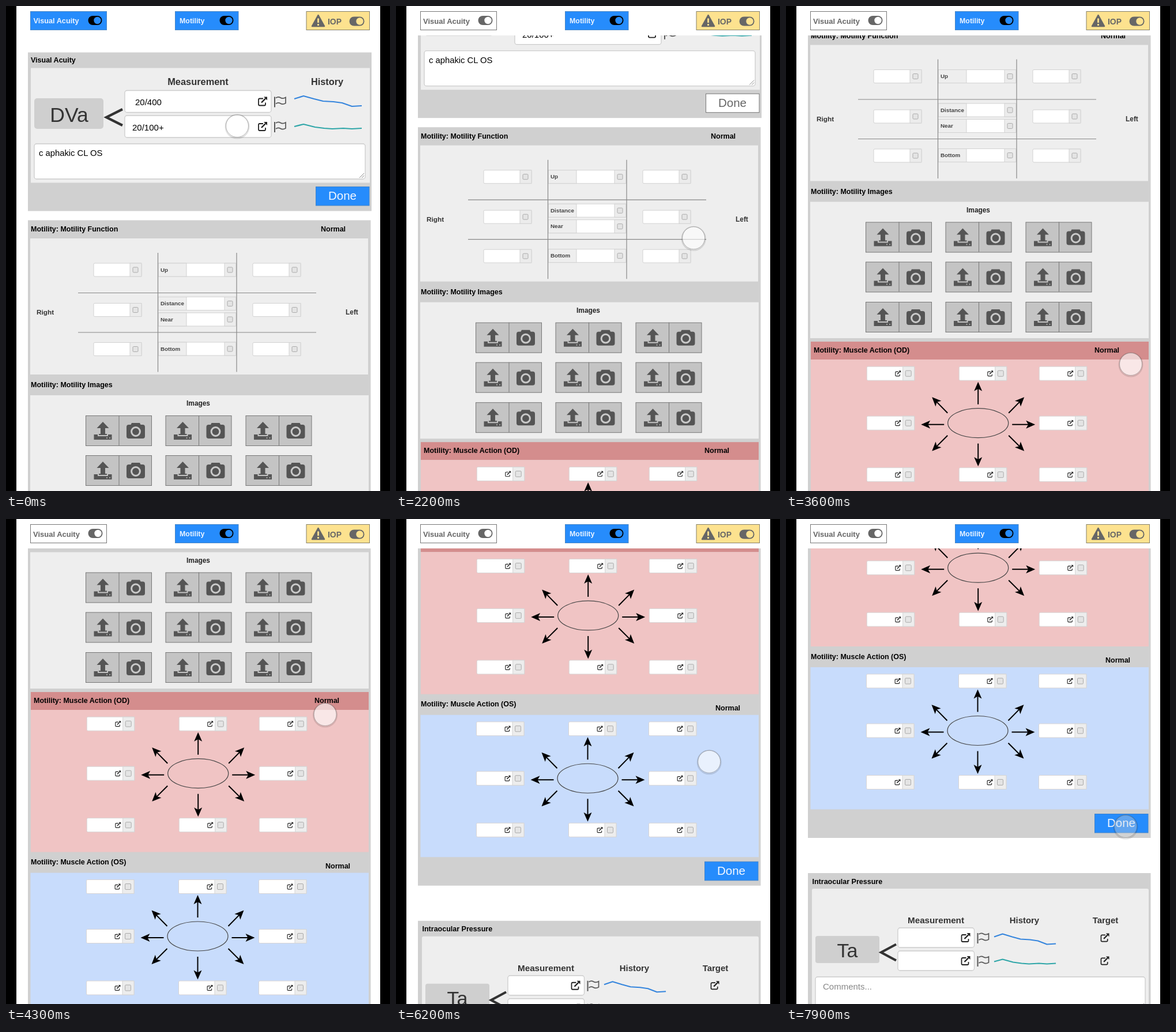
These frames come from a looping animation (666 by 841 pixels, 8 s). An HTML page:

```html
<!DOCTYPE html>
<html lang="en">
<head>
<meta charset="utf-8">
<title>Eye exam form</title>
<style>
html, body { margin: 0; width: 100%; height: 100%; overflow: hidden; background: #fff; }
svg { display: block; width: 666px; height: 841px; font-family: "Liberation Sans", Arial, sans-serif; }
</style>
</head>
<body>
<svg id="stage" viewBox="0 0 666 841" xmlns="http://www.w3.org/2000/svg"></svg>
<script>
const BLUE = '#268cfc', GREY = '#d0d0d0', PANEL = '#eeeeee', INK = '#333', MID = '#666';

const rect = (x, y, w, h, fill, extra = '') =>
  `<rect x="${x}" y="${y}" width="${w}" height="${h}" fill="${fill}" ${extra}/>`;
const path = (d, stroke, width = 1, extra = '') =>
  `<path d="${d}" fill="none" stroke="${stroke}" stroke-width="${width}" ${extra}/>`;
const text = (s, x, y, size, fill = '#000', extra = '') =>
  `<text x="${x}" y="${y}" font-size="${size}" fill="${fill}" ${extra}>${s}</text>`;
const bold = (s, x, y, size = 12.5, fill = '#000', extra = '') =>
  text(s, x, y, size, fill, `font-weight="700" ${extra}`);
const MIDDLE = 'text-anchor="middle"';
const at = (x, y, body, scale = 1) => `<g transform="translate(${x} ${y}) scale(${scale})">${body}</g>`;

// Icons are drawn around their own centre.
const link = (x, y, size) => at(x, y,
  path('M1-5H-5Q-7-5-7-3V5Q-7 7-5 7H3Q5 7 5 5V2', '#222', 1.8) +
  path('M-2 2L5-5', '#222', 2.4) + '<path d="M2-8H8V-2Z" fill="#222"/>', size / 16);

const flag = (x, y) => at(x, y,
  path('M-9-7V11', '#555', 2) +
  path('M-7-5Q-3-8 1-5.500T10-6V4Q5 7 1 4.500T-7 5', '#555', 1.7));

const toggle = (x, y, w, fill, knob) =>
  rect(x - w / 2, y - 8, w, 16, fill, 'rx="8"') +
  `<circle cx="${x + w / 2 - 8}" cy="${y}" r="6.2" fill="${knob}"/>`;

const checkbox = (x, y, size) =>
  rect(x - size / 2, y - size / 2, size, size, '#e4e4e4', 'rx="1.500" stroke="#aaa"');

const less = (x, y, w) =>
  path(`M${x + w} ${y - 14}L${x + 2} ${y}L${x + w} ${y + 14}`, INK, 4.2);

const input = (x, y, w, h) => rect(x, y, w, h, '#fff', 'rx="4" stroke="#ccc" stroke-width="1.300"');

function area(x, y, w, h) {
  const r = x + w, b = y + h;
  return input(x, y, w, h) +
    path(`M${r - 10} ${b - 2}L${r - 2} ${b - 10}M${r - 6} ${b - 2}L${r - 2} ${b - 6}`, '#888');
}

function history(x, y, k) {
  const line = (dy, points, color) =>
    path('M' + points.map(([px, py]) => `${x + px * k} ${y + dy + py}`).join('L'), color, 2.2, 'stroke-linejoin="round"');
  return line(0, [[0, 5], [16, 0], [34, 5], [50, 9], [68, 10], [83, 12], [100, 18], [117, 17]], '#3585dd') +
    line(k < 1 ? 44 : 49, [[0, 4], [16, 0], [36, 5], [52, 7], [66, 8], [85, 7], [100, 8], [117, 7]], '#2fa6a8');
}

function measure(x, y, w, h, gap) {
  return [0, gap].map(d => input(x, y + d, w, h) +
    link(x + w - 15, y + d + h / 2, 16) + flag(x + w + 15, y + d + h / 2 - 1)).join('');
}

const doneButton = (x, y, id = '') => `<g ${id}>` +
  rect(x + .5, y + .5, 92.5, 32.5, BLUE, 'stroke="#3f83cc"') +
  text('Done', x + 46.5, y + 23, 20.5, '#f4f8ff', MIDDLE) + '</g>';

const acuity = () =>
  rect(38, 80.5, 596, 275, GREY) + bold('Visual Acuity', 43, 98) +
  rect(43, 107.5, 588, 199, PANEL) +
  bold('Measurement', 333, 137, 16.4, INK, MIDDLE) + bold('History', 557, 137, 16.3, INK, MIDDLE) +
  rect(49, 160, 120, 53, '#cfcfcf', 'rx="5"') + text('DVa', 109.5, 201, 35.5, INK, MIDDLE) +
  less(172, 193, 30) + measure(206, 146.5, 254, 38, 43.5) +
  text('20/400', 224, 172, 15) + text('20/100+', 219, 216, 15) +
  history(500, 156, 1) + area(49, 239, 574, 61) + text('c aphakic CL OS', 57, 260, 14.8) +
  doneButton(537, 313, 'id="done"');

function gridField(x, y, label) {
  const w = label ? 135 : 83, start = label ? 49 : 0;
  return rect(x, y - 11.5, w, 23, '#fff', 'rx="2" stroke="#d2d2d2"') +
    (label ? rect(x, y - 11.5, 49, 23, PANEL, 'stroke="#d2d2d2"') + bold(label, x + 4, y + 3, 9.8, '#444') : '') +
    rect(x + w - 20, y - 11.5, 20, 23, '#ececec', 'stroke="#d2d2d2"') + checkbox(x + w - 10.5, y, 9);
}

const motility = () =>
  bold('Motility: Motility Function', 43, 391) + bold('Normal', 546, 391) +
  rect(42, 403, 586, 236, PANEL) +
  [457.5, 527, 595].map(y => gridField(152, y) + gridField(428, y)).join('') +
  [['Up', 457.5], ['Distance', 516], ['Near', 543.5], ['Bottom', 594.5]]
    .map(([label, y]) => gridField(264, y, label)).join('') +
  path('M263.500 428V634.500M400 428V634.500M125 497.500H538M125 566H538', '#888', 1.2) +
  bold('Right', 53, 535, 11.8, INK) + bold('Left', 589, 535, 11.9, INK);

const uploadIcon =
  '<path d="M0-15L10.500-4H4V6H7V8H-7V6H-4V-4H-10.500Z" fill="#555"/>' +
  '<path d="M-15.500 7H-9V10H9V7H15.500V16H-15.500Z" fill="#555"/>' +
  '<circle cx="7" cy="13" r="1" fill="#c4c4c4"/><circle cx="12" cy="13" r="1" fill="#c4c4c4"/>';
const cameraIcon =
  rect(-16, -10, 32, 24, '#555', 'rx="4"') +
  '<path d="M-9-9L-7-13H7L9-9Z" fill="#555"/>' +
  '<circle cy="2" r="7.400" fill="#555" stroke="#c9c9c9" stroke-width="3"/>';

const imageButton = (x, y) =>
  rect(x + .5, y + .5, 114, 52, '#c4c4c4', 'stroke="#777"') + path(`M${x + 58} ${y}V${y + 52}`, '#777') +
  at(x + 30, y + 26, uploadIcon) + at(x + 87, y + 26, cameraIcon);

const images = () =>
  bold('Motility: Motility Images', 43, 661) + rect(42, 675, 587, 236.5, PANEL) +
  bold('Images', 333.5, 693, 11.9, '#222', MIDDLE) +
  [710, 779, 848.5].map(y => [138, 276.5, 415.5].map(x => imageButton(x, y)).join('')).join('');

function arrow(x1, y1, x2, y2) {
  const angle = Math.atan2(y2 - y1, x2 - x1) * 180 / Math.PI;
  const length = Math.hypot(x2 - x1, y2 - y1);
  return `<g transform="translate(${x2} ${y2}) rotate(${angle})">` +
    path(`M${-length} 0H-10`, '#000', 2) + '<path d="M0 0L-16-7L-12 0L-16 7Z"/></g>';
}

function muscleField(x, y) {
  return rect(x, y - 12, 82.5, 24, '#fff', 'rx="2" stroke="#d8d4d4"') +
    rect(x + 62.5, y - 12, 20, 24, '#ededed', 'stroke="#d4d4d4"') +
    link(x + 54, y, 10) + checkbox(x + 72, y, 10);
}

// Eye with its eight gaze arrows and fields, around the ellipse centre.
function muscles(x, y) {
  let out = '<ellipse rx="52.500" ry="25.500" fill="none" stroke="#444" stroke-width="1.200"/>';
  out += arrow(0, -32.5, 0, -71.5) + arrow(0, 35.5, 0, 75);
  for (const side of [-1, 1]) {
    out += arrow(side * 59, 2.5, side * 99, 2.5) +
      arrow(side * 53, -17.5, side * 80, -45) + arrow(side * 53, 21.5, side * 80, 48.5);
  }
  for (const fx of [-193, -33, 106])
    for (const fy of [-86, 0, 89.5])
      if (fx !== -33 || fy) out += muscleField(fx, fy);
  return at(x, y, out);
}

const actions = () =>
  rect(43, 917.5, 586, 31, '#d48d8d') + rect(43, 948.5, 586, 246.5, '#f0c4c4') +
  bold('Motility: Muscle Action (OD)', 48, 936.5) + bold('Normal', 535, 936.5) + muscles(333.2, 1058.7) +
  bold('Motility: Muscle Action (OS)', 43, 1216.5) + bold('Normal', 554, 1223) +
  rect(42.5, 1231, 586.5, 246.5, '#c8dcfc') + muscles(332.5, 1341) + doneButton(535, 1485);

const pressure = () =>
  rect(38, 1588, 594.5, 280, GREY) + bold('Intraocular Pressure', 45.5, 1606.5) +
  rect(45, 1615, 584, 240, PANEL, 'rx="3"') +
  bold('Measurement', 260, 1675, 15.2, INK, MIDDLE) + bold('History', 413.5, 1675, 14.9, INK, MIDDLE) +
  bold('Target', 554, 1675, 15, INK, MIDDLE) +
  rect(51, 1697, 111, 47, '#cfcfcf', 'rx="4"') + text('Ta', 106.5, 1734, 34, INK, MIDDLE) +
  less(163, 1725.5, 28) + measure(194, 1683, 132.5, 34, 40) + history(361, 1693.5, .915) +
  link(553, 1700, 15) + link(553, 1740, 15) +
  area(51, 1768, 572, 56) + text('Comments...', 64, 1790, 15, '#888');

const header = () =>
  rect(18, 0, 631, 51, '#fff') +
  '<g id="acuityOn">' + rect(42.5, 9.5, 132, 32, BLUE, 'stroke="#4a86c4"') +
  bold('Visual Acuity', 47.5, 29.5, 12.7, '#eaf3ff') + toggle(154.5, 25, 24, '#000', BLUE) + '</g>' +
  '<g id="acuityOff">' + rect(42.5, 9.5, 132, 32, '#fff', 'stroke="#777"') +
  bold('Visual Acuity', 47, 30.5, 13, MID) + toggle(155, 25, 25, MID, '#fff') + '</g>' +
  rect(293.5, 9.5, 109.5, 32, BLUE, 'stroke="#4a86c4"') +
  bold('Motility', 301, 29.5, 12.4, '#eaf3ff') + toggle(382.5, 25, 24, '#000', BLUE) +
  rect(521, 9.5, 109.5, 32, '#fde28f', 'stroke="#858069"') +
  '<path d="M541.500 16L552 35H531Z" fill="#666" stroke="#666" stroke-width="2.500" stroke-linejoin="round"/>' +
  path('M541.500 21.500V29M541.500 31V34', '#fde28f', 2.8) +
  bold('IOP', 558, 32, 13.9, MID) + toggle(608.5, 26.5, 26, MID, '#fde28f');

const stage = document.getElementById('stage');
stage.innerHTML =
  rect(0, 0, 666, 841, '#fff') +
  '<g id="page">' + acuity() + rect(38, 371.5, 594.5, 1155.5, GREY) + motility() + images() +
  actions() + pressure() + '</g>' + header() +
  rect(0, 0, 18, 841, '#000') + rect(649, 0, 17, 841, '#000') +
  '<g id="touch"><circle cy="1" r="20.500" fill="none" stroke="#000" stroke-opacity=".12" stroke-width="2"/>' +
  '<circle id="disc" r="19.500" stroke="#777" stroke-opacity=".55"/></g>';

const $ = id => document.getElementById(id);
const smooth = u => u * u * (3 - 2 * u);
const glide = u => Math.sin(u * Math.PI / 2);

// time, touch x, touch y, scroll, easing into this pose
const poses = [
  [0, 401, 208, 0],
  [150, 401, 208, 0],
  [900, 577, 330, 0],
  [1250, 577, 330, 0],
  [1820, 520, 563.5, 0],
  [2600, 512, 228, 335.5],
  [2850, 512, 228, 335.5],
  [3500, 598, 621, 335.5],
  [3600, 598, 621, 335.5],
  [4280, 553.5, 339, 617.5],
  [4600, 553.5, 339, 617.5],
  [5350, 562, 694.5, 617.5],
  [5520, 562, 694.5, 617.5],
  [6740, 537.5, 338, 974, glide],
  [6950, 537.5, 338, 974],
  [7650, 589, 533, 974],
  [8000, 589, 533, 974]
];
const LOOP = 8000, STEP = 100, PRESS = 1100;

function poseAt(t) {
  const i = poses.findIndex(p => p[0] > t);
  const a = poses[i - 1], b = poses[i];
  const u = (b[4] || smooth)((t - a[0]) / (b[0] - a[0]));
  return [1, 2, 3].map(k => a[k] + (b[k] - a[k]) * u);
}

function draw(t) {
  const [x, y, scroll] = poseAt(t);
  $('page').setAttribute('transform', `translate(0 ${-scroll})`);
  $('touch').setAttribute('transform', `translate(${x} ${y})`);

  const pressed = (t >= 1000 && t < 1250) || t >= 7700;
  $('disc').setAttribute('fill', pressed ? '#d0d4d8' : '#fff');
  $('disc').setAttribute('fill-opacity', pressed ? .35 : .6);

  const off = t >= PRESS;
  $('acuityOn').setAttribute('display', off ? 'none' : 'inline');
  $('acuityOff').setAttribute('display', off ? 'inline' : 'none');
  const [box, label] = $('done').children;
  box.setAttribute('fill', off ? '#fff' : BLUE);
  box.setAttribute('stroke', off ? '#777' : '#3f83cc');
  label.setAttribute('fill', off ? MID : '#f4f8ff');
}

const start = performance.now();
function tick() {
  const t = (performance.now() - start) % LOOP;
  draw(Math.floor(t / STEP) * STEP);
  requestAnimationFrame(tick);
}
tick();
</script>
</body>
</html>
```
